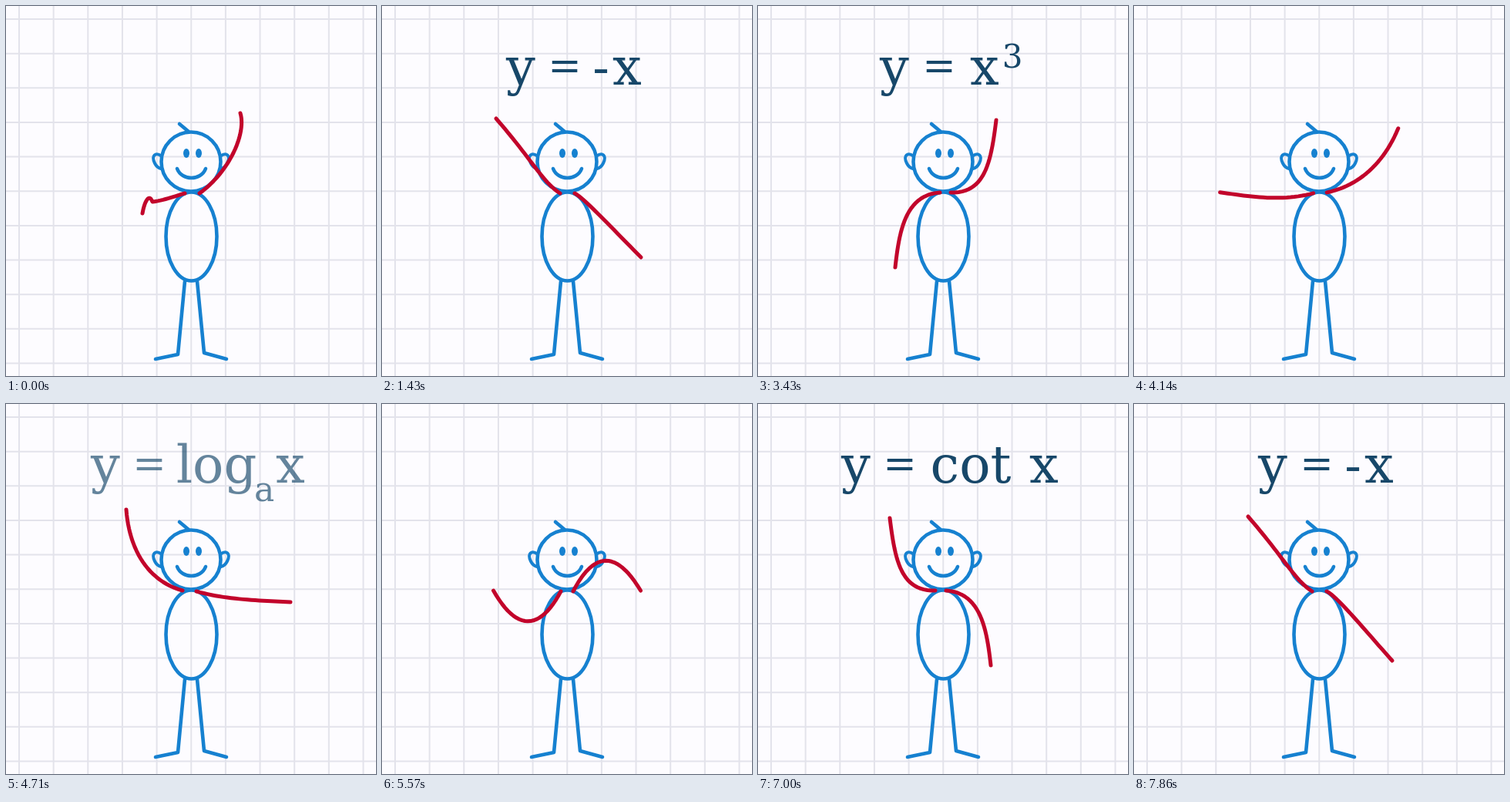
An HTML page with a canvas that plays this animation: 480 by 480 pixels, repeating every 8000 ms.

```html
<!DOCTYPE html>
<html lang="en">
<head>
<meta charset="utf-8">
<title>Function dance</title>
<style>
  html, body { margin: 0; width: 100%; height: 100%; overflow: hidden; background: #fdfcff; }
  canvas { display: block; width: 100vw; height: 100vh; }
</style>
</head>
<body>
<canvas id="stage" width="480" height="480"></canvas>
<script>
const ctx = document.getElementById("stage").getContext("2d");
const LOOP = 8000, FPS = 7, SAMPLES = 24, MOVE = 130;
const BLUE = "#1681d0", RED = "#c2042b", INK = "#174769";
const NECK = { x: 240, y: 243 };

const clamp = v => Math.max(0, Math.min(1, v));
const mix = (a, b, k) => a + (b - a) * k;
const ease = k => k * k * (3 - 2 * k);

// Arms are sampled cubic curves, written for the right side.
function curve(x0, y0, x1, y1, x2, y2, x3, y3, n = SAMPLES) {
  return Array.from({ length: n + 1 }, (_, i) => {
    const t = i / n, s = 1 - t;
    const at = (a, b, c, d) => s*s*s*a + 3*s*s*t*b + 3*s*t*t*c + t*t*t*d;
    return { x: at(x0, x1, x2, x3), y: at(y0, y1, y2, y3) };
  });
}
const mirror = arm => arm.map(p => ({ x: 480 - p.x, y: p.y }));

const diagDown = curve(250, 243, 262, 249, 300, 290, 336, 326);
const diagLow = curve(250, 243, 264, 250, 300, 294, 335, 333);
const diagUp = curve(249, 243, 272, 228, 285, 200, 332, 146);
const bendUp = curve(250, 242, 294, 243, 302, 205, 309, 148);
const bendDown = curve(244, 242, 290, 245, 297, 295, 302, 339);
const wideUp = curve(251, 242, 295, 230, 320, 190, 324, 137);
const level = curve(247, 243, 285, 254, 330, 255, 369, 257);
const wave = curve(246, 242, 290, 236, 285, 308, 329, 307);
const hump = curve(248, 243, 275, 190, 305, 190, 335, 243);
const dip = curve(248, 243, 275, 296, 305, 296, 335, 243);
const reach = curve(251, 243, 290, 215, 312, 165, 304, 139);
const hook = curve(248, 243, 265, 248, 275, 252, 290, 254, 12)
  .concat(curve(290, 254, 294, 243, 300, 252, 303, 269, 12).slice(1));
const slope = curve(249, 243, 266, 256, 290, 284, 331, 326);

// Label parts: text, centre x, size, baseline.
const head = (y, eq) => [["y", y, 67, 102], ["=", eq, 52, 95]];
const word = name => [...head(127, 184), [name, 276, 67, 102], ["x", 371, 67, 102]];
const power = (n, sign) => [...head(177, 235), ["x", 294, 67, 102], [n, 330, 42, 80],
  ...(sign ? [["-", 265, 60, 102]] : [])];
const bars = [["|", 277, 70, 102], ["x", 319, 67, 102], ["|", 359, 70, 102]];
const minus = x => ["-", x, 64, 102];

const labels = {
  x: [...head(180, 237), ["x", 300, 67, 102]],
  negX: [...head(180, 237), minus(284), ["x", 318, 67, 102]],
  abs: [...head(160, 219), ...bars],
  negAbs: [...head(143, 202), minus(248), ...bars],
  log: [...head(129, 186), ["log", 273, 67, 102], ["a", 335, 44, 126], ["x", 369, 67, 102]],
  exp: [...head(177, 235), ["a", 294, 67, 102], ["x", 330, 42, 80]]
};

const key = (time, left, right, label) => ({ time, left: mirror(left), right, label });
const turn = t => [
  key(t, hook, reach),
  key(t + 80, bendDown, bendUp, word("tan")),
  key(t + 480, bendUp, bendDown, word("cot")),
  key(t + 880, slope, diagUp, labels.x)
];
const keys = [
  ...turn(0),
  key(1250, diagUp, diagLow, labels.negX),
  key(1428, diagUp, diagDown),
  key(1847, slope, diagDown, labels.negAbs),
  key(2290, bendUp, bendUp, power("2")),
  key(2750, bendDown, bendDown, power("2", true)),
  key(3210, bendDown, bendUp, power("3")),
  key(3690, bendUp, bendDown, power("3", true)),
  key(4170, level, wideUp, labels.exp),
  key(4668, wideUp, level, labels.log),
  key(5120, diagUp, diagUp, labels.abs),
  key(5580, dip, hump, word("sin")),
  key(6033, wave, wave, word("cos")),
  ...turn(6429),
  key(7780, diagUp, diagLow, labels.negX),
  key(7990, diagUp, diagDown)
];

// Swings around the neck so that arms keep their length.
function swing(a, b, k, side) {
  const polar = p => {
    const dx = (p.x - NECK.x) * side, dy = p.y - NECK.y;
    return { r: Math.hypot(dx, dy), angle: Math.atan2(dy, dx) };
  };
  return a.map((p, i) => {
    const from = polar(p), to = polar(b[i]);
    const r = mix(from.r, to.r, k), angle = mix(from.angle, to.angle, k);
    return { x: NECK.x + side * r * Math.cos(angle), y: NECK.y + r * Math.sin(angle) };
  });
}

function stroke(color, width, build) {
  ctx.strokeStyle = color;
  ctx.lineWidth = width;
  ctx.beginPath();
  build();
  ctx.stroke();
}

function line(...pts) {
  ctx.moveTo(pts[0], pts[1]);
  for (let i = 2; i < pts.length; i += 2) ctx.lineTo(pts[i], pts[i + 1]);
}

function drawGrid() {
  ctx.fillStyle = "#fdfcff";
  ctx.fillRect(0, 0, 480, 480);
  stroke("#e3e3eb", 2, () => {
    for (let i = 0; i < 11; i++) {
      const p = 17 + i * 44.65;
      line(p, 0, p, 480);
      line(0, p, 480, p);
    }
  });
}

function drawBody() {
  stroke(BLUE, 4.6, () => {
    ctx.arc(240, 202, 38.5, 0, Math.PI * 2);
    ctx.moveTo(273.5, 299);
    ctx.ellipse(240.5, 299, 33, 57.5, 0, 0, Math.PI * 2);
    line(225, 153, 237, 163);
    line(232, 357, 223, 452, 194, 458);
    line(248, 357, 257, 450, 286, 458);
    ctx.moveTo(222, 211);
    ctx.bezierCurveTo(228, 227, 253, 227, 259, 211);
  });
  stroke(BLUE, 4, () => {
    for (const s of [-1, 1]) {
      ctx.moveTo(240 + s * 38, 195);
      ctx.bezierCurveTo(240 + s * 46, 189, 240 + s * 52, 194, 240 + s * 47, 204);
      ctx.quadraticCurveTo(240 + s * 44, 210, 240 + s * 39, 211);
    }
  });
  ctx.fillStyle = BLUE;
  for (const x of [234, 250]) {
    ctx.beginPath();
    ctx.ellipse(x, 191, 4, 6, 0, 0, Math.PI * 2);
    ctx.fill();
  }
}

function drawArm(pts) {
  stroke(RED, 5, () => line(...pts.flatMap(p => [p.x, p.y])));
}

function drawLabel(parts, alpha) {
  ctx.globalAlpha = alpha;
  ctx.fillStyle = INK;
  ctx.textAlign = "center";
  for (const [text, x, size, y] of parts) {
    ctx.font = `${size}px "DejaVu Serif", serif`;
    ctx.fillText(text, x, y);
  }
  ctx.globalAlpha = 1;
}

function draw(t) {
  drawGrid();
  ctx.lineCap = ctx.lineJoin = "round";
  drawBody();

  const i = keys.findLastIndex(k => k.time <= t);
  const now = keys[i], next = keys[i + 1] || now;
  const span = Math.min(MOVE, next.time - now.time) || 1;
  const k = next === now ? 0 : ease(clamp((t - next.time + span) / span));
  drawArm(swing(now.left, next.left, k, -1));
  drawArm(swing(now.right, next.right, k, 1));

  for (const { time, label } of keys) {
    const age = t - time;
    const alpha = Math.min(clamp(age / 70), clamp((320 - age) / 90));
    if (label && alpha > 0) drawLabel(label, alpha);
  }
}

function tick() {
  const t = performance.now() % LOOP;
  const step = Math.floor(t * FPS / 1000 + 0.03) % (LOOP * FPS / 1000);
  draw(step * 1000 / FPS);
  requestAnimationFrame(tick);
}
tick();
</script>
</body>
</html>
```
